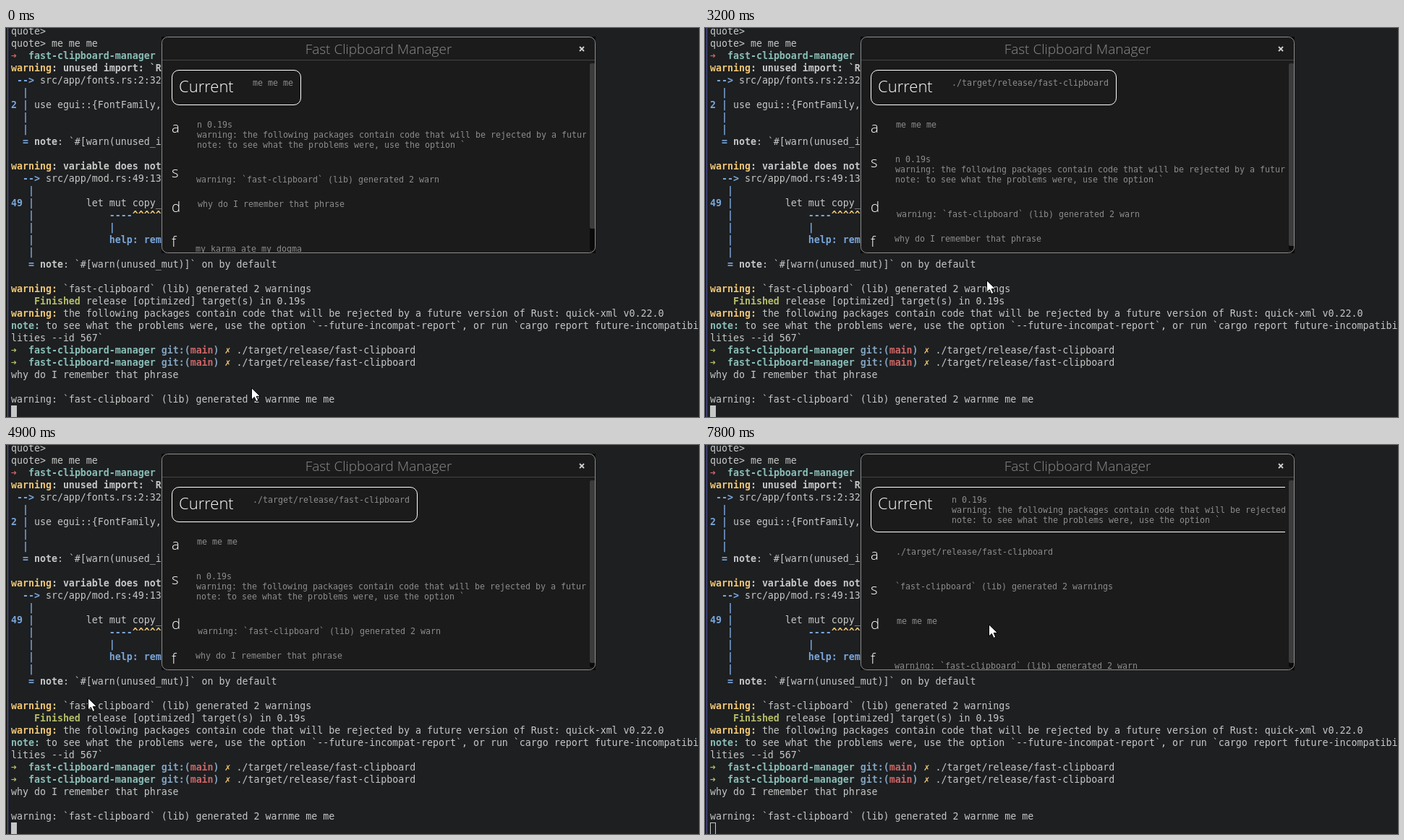
Write an HTML page that moves like this. It is 958 px wide and 539 px high and loops after 8 s.

```html
<!DOCTYPE html>
<html lang="en">
<head>
<meta charset="utf-8">
<title>Clipboard manager demo</title>
<style>
  html, body { margin: 0; width: 100%; height: 100%; overflow: hidden; background: #1d1f21; }
  .layer { position: absolute; left: 0; top: 0; width: 958px; height: 539px; overflow: hidden; }
  pre {
    margin: 0; position: absolute; left: 7px; top: -4px; color: #c5c8c6;
    font: 13.288px/17px "DejaVu Sans Mono", monospace;
  }
  .y { color: #f0c674 } .b { color: #7aa6da } .g { color: #b5bd68 }
  .c { color: #8abeb7 } .r { color: #cc6666 } .p { color: #81a2be }
  #sel { background: #f0c674; }
  #sel pre, #sel b { color: #1d1f21; }
  #edge { position: absolute; left: 2px; top: 0; width: 1px; height: 539px; background: #5559b0; }
  #block {
    position: absolute; left: 7px; top: 523px; width: 8px; height: 17px;
    box-sizing: border-box; border: 1px solid #c5c8c6;
  }
  svg text { white-space: pre; }
  .mono { font: 11.63px "DejaVu Sans Mono", monospace; fill: #8c8c8c; }
  .ui { font-family: "Open Sans", "Noto Sans", sans-serif; font-weight: 300; fill: #fff; }
</style>
</head>
<body>
<div class="layer" id="term"><div id="edge"></div><pre></pre><div id="block"></div></div>
<div class="layer" id="sel"><pre></pre></div>
<svg class="layer" width="958" height="539" viewBox="0 0 958 539">
  <clipPath id="view"><rect x="216" y="45" width="586" height="266"/></clipPath>
  <rect x="215" y="12" width="600" height="300" fill="#0a0a0a"/>
  <rect x="215.5" y="12.5" width="599" height="299" rx="8" fill="#1b1b1b"/>
  <rect x="807" y="49" width="8" height="259" rx="2" fill="#0a0a0a"/>
  <rect id="thumb" x="807" y="49" width="8" height="229" rx="2" fill="#3c3c3c"/>
  <path d="M216 44.5H814" stroke="#444"/>
  <rect x="215.5" y="12.5" width="599" height="299" rx="8" fill="none" stroke="#8c8c8c"/>
  <text class="ui" x="515" y="36" font-size="19" text-anchor="middle" style="fill:#8c8c8c">Fast Clipboard Manager</text>
  <path d="M793 26l6 6m0-6l-6 6" stroke="#d0d0d0" stroke-width="1.8"/>
  <g id="list" clip-path="url(#view)"></g>
  <path id="mouse" d="M.5 .8V17l3.8-3.6 2.7 6 2.8-1.2-2.6-5.8h5.3z" fill="#fff" stroke="#000"/>
</svg>
<script>
const LOOP = 8000, CELL = 8, ROW = 17, LEFT = 7;
const $ = id => document.getElementById(id);
const paint = cls => s => `<b class="${cls}">${s}</b>`;
const [Y, B, G, C, R, P, W] = ['y', 'b', 'g', 'c', 'r', 'p', 'w'].map(paint);

// Terminal contents
const bin = './target/release/fast-clipboard';
const made = '`fast-clipboard` (lib) generated 2 warn';
const future = 'the following packages contain code that will be rejected by a future version of Rust: quick-xml v0.22.0';
const see = 'to see what the problems were, use the option `';
const phrase = 'why do I remember that phrase';
const home = arrow => arrow('➜') + '  ' + C('fast-clipboard-manager');
const prompt = `${home(G)} ${P('git:(')}${R('main')}${P(')')} ${Y('✗')} ${bin}`;
const bar2 = B('  |'), bar3 = B('   |');
const pad = ' '.repeat(13);

const lines = [
  'quote&gt;',
  'quote&gt; me me me',
  home(R),
  Y('warning') + W(': unused import: `R'),
  B(' --&gt;') + ' src/app/fonts.rs:2:32',
  bar2,
  B('2 |') + ' use egui::{FontFamily,',
  bar2,
  bar2,
  B('  =') + W(' note') + ': `#[warn(unused_i',
  '',
  Y('warning') + W(': variable does not'),
  B('  --&gt;') + ' src/app/mod.rs:49:13',
  bar3,
  B('49 |') + '         let mut copy_',
  bar3 + pad + B('----') + Y('^^^^^'),
  bar3 + pad + B('|'),
  bar3 + pad + B('help: rem'),
  bar3,
  B('   =') + W(' note') + ': `#[warn(unused_mut)]` on by default',
  '',
  Y('warning:') + ` ${made}ings`,
  G('    Finished') + ' release [optimized] target(s) in 0.19s',
  Y('warning:') + ' ' + future,
  C('note:') + ` ${see}--future-incompat-report\`, or run \`cargo report future-incompatibi`,
  'lities --id 567`',
  prompt,
  prompt,
  phrase,
  '',
  `warning: ${made}me me me`
];
document.querySelectorAll('pre').forEach(p => p.innerHTML = lines.join('\n'));

// Clipboard history, current entry first
const me = ['me me me'], run = [bin], lib = [made + 'ings'], why = [phrase];
const note = ['n 0.19s', 'warning: ' + future, 'note: ' + see];
const warn = ['', 'warning: ' + made], karma = ['', 'my karma ate my dogma'];
const history = [
  [0, [me, note, warn, why, karma]],
  [3200, [run, me, note, warn, why]],
  [5300, [lib, run, me, note, warn]],
  [7100, [run, lib, me, note, warn]],
  [7700, [note, run, lib, me, warn]]
];

const mono = (clip, x, y) => clip.map((s, i) =>
  `<text class="mono" x="${x}" y="${y + 4 + i * 14}">${s}</text>`).join('');
const label = (s, x, y, size) =>
  `<text class="ui" x="${x}" y="${y}" font-size="${size}">${s}</text>`;
const tall = clip => Math.max(28, clip.length * 14);

function listMarkup([current, ...rest]) {
  const width = 123 + 7 * Math.max(...current.map(s => s.length));
  let out = `<rect x="229.5" y="58.5" width="${width - 1}" height="${tall(current) + 20}" rx="9.5" fill="none" stroke="#fff"/>`
    + label('Current', 239, 89, 22) + mono(current, 341, 76);
  let y = 106 + tall(current);
  rest.forEach((clip, i) => {
    out += label('asdf'[i], 229, y + 11, 20.5) + mono(clip, [264, 263, 265, 262][i], y);
    y += tall(clip) + 20;
  });
  return out;
}

// Keys: time, then values; linear in between
const path = [
  [100, 339, 498], [500, 571, 471], [600, 571, 471], [800, 574, 461],
  [900, 574, 461], [1600, 323, 464], [1900, 323, 464], [2200, 382, 415],
  [2300, 382, 415], [2400, 390, 391], [3100, 390, 391], [3200, 389, 349],
  [3500, 428, 360], [4000, 136, 368], [4100, 100, 373], [4400, 73, 345],
  [4500, 73, 345], [4700, 75, 353], [4800, 75, 353], [5600, 378, 325],
  [5700, 386, 319], [6100, 406, 262], [6400, 394, 237], [6600, 394, 237],
  [6800, 394, 243], [7600, 394, 243], [7800, 392, 248]
];
const drag = [[1000, 67], [1600, 40], [3600, 46], [4000, 20], [4100, 11], [4200, 9]];

function at(keys, t) {
  const i = keys.findIndex(k => k[0] > t);
  if (i < 1) return keys.at(i).slice(1);
  const a = keys[i - 1], b = keys[i], k = (t - a[0]) / (b[0] - a[0]);
  return a.slice(1).map((v, j) => v + (b[j + 1] - v) * k);
}

// Selected area as a polygon, or null
function selection(t) {
  const first = t >= 1000 && t < 1800, second = t >= 3600 && t < 4900;
  if (!first && !second) return null;
  const x = LEFT + CELL * Math.round(at(drag, t)[0]);
  const end = LEFT + CELL * (first ? 72 : 53);
  const top = ROW * (first ? 27 : 21) - 4, low = top + ROW;
  if (t >= 4300 && t < 4600) {
    return [[x, top - ROW], [958, top - ROW], [958, top], [end, top],
            [end, low], [LEFT, low], [LEFT, top], [x, top]];
  }
  return [[x, top], [end, top], [end, low], [x, low]];
}

let shown = null;
function render(ms) {
  const t = Math.floor(ms / 100) * 100;
  const [x, y] = at(path, t).map(Math.round);
  $('mouse').setAttribute('transform', `translate(${x} ${y})`);

  const area = selection(t);
  $('sel').style.display = area ? '' : 'none';
  if (area) $('sel').style.clipPath = `polygon(${area.map(p => p.join('px ') + 'px')})`;
  $('block').style.display = area ? 'none' : '';
  $('block').style.background = y < 312 ? 'none' : '#c5c8c6';

  const state = history.findLast(h => h[0] <= t);
  if (state !== shown) {
    shown = state;
    $('list').innerHTML = listMarkup(state[1]);
    $('thumb').setAttribute('height', state[0] ? 253 : 229);
  }
}

const start = performance.now();
function tick() {
  render((performance.now() - start) % LOOP);
  requestAnimationFrame(tick);
}
tick();
</script>
</body>
</html>
```
